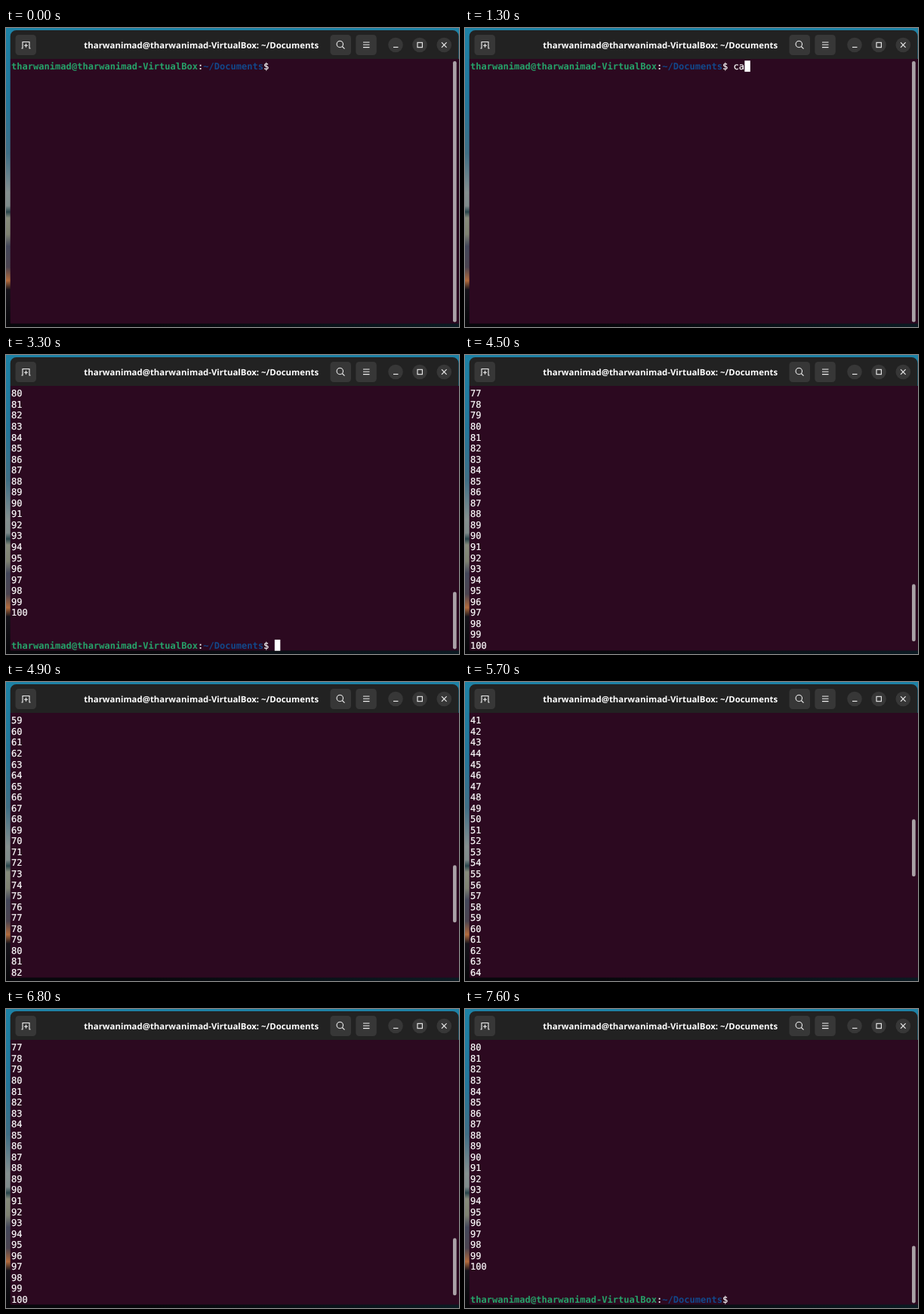
Recreate the animation shown at these times as an HTML page. Size 600x397 px, loop 8 s.

```html
<!DOCTYPE html>
<html lang="en">
<head>
<meta charset="utf-8">
<title>Terminal</title>
<style>
  html, body { margin: 0; width: 100%; height: 100%; overflow: hidden; background: #050508; }
  svg { display: block; width: 600px; height: 397px; }
  text { white-space: pre; text-rendering: geometricPrecision; }
  .title { font: bold 11.4px "Noto Sans", "Open Sans", sans-serif; fill: #fff; }
  .term text { font: 12.07px "DejaVu Sans Mono", monospace; fill: #fff; stroke: #fff; stroke-width: .2; }
  .term .user { font-weight: bold; fill: #26a269; stroke: none; }
  .term .path { font-weight: bold; fill: #12488b; stroke: none; }
  .btn { fill: #373737; }
  .icon { fill: none; stroke: #f2f2f2; stroke-width: 1.1; }
</style>
</head>
<body>
<svg viewBox="0 0 600 397">
  <defs>
    <linearGradient id="sky" x1="0" y1="0" x2="0" y2="1">
      <stop offset="0" stop-color="#1d82a6"/>
      <stop offset=".25" stop-color="#22779b"/>
      <stop offset=".42" stop-color="#3f6f86"/>
      <stop offset=".55" stop-color="#84908f"/>
      <stop offset=".595" stop-color="#7f8c8b"/>
      <stop offset=".615" stop-color="#27444a"/>
      <stop offset=".635" stop-color="#868c7c"/>
      <stop offset=".69" stop-color="#7e8272"/>
      <stop offset=".73" stop-color="#43475a"/>
      <stop offset=".8" stop-color="#4b4450"/>
      <stop offset=".845" stop-color="#b26b3c"/>
      <stop offset=".875" stop-color="#15131a"/>
      <stop offset="1" stop-color="#050508"/>
    </linearGradient>
    <linearGradient id="ground">
      <stop offset=".3" stop-color="#07070b"/>
      <stop offset="1" stop-color="#0b1a22"/>
    </linearGradient>
  </defs>

  <rect width="600" height="397" fill="url(#sky)"/>
  <rect x="6" y="392" width="594" height="5" fill="url(#ground)"/>
  <path d="M5.7 41V11a8 8 0 0 1 8-8H591.5a8 8 0 0 1 8 8V41Z" fill="#222"/>
  <rect x="5.7" y="41" width="594.3" height="351.5" fill="#2c0920"/>

  <text class="title" x="258.7" y="26.5" text-anchor="middle">tharwanimad@tharwanimad-VirtualBox: ~/Documents</text>

  <g class="btn">
    <rect x="12.5" y="9" width="27.5" height="27" rx="4.5"/>
    <rect x="429.5" y="9" width="27.5" height="27" rx="4.5"/>
    <rect x="463.3" y="9" width="27.5" height="27" rx="4.5"/>
    <circle cx="516" cy="22.5" r="9.8"/>
    <circle cx="548" cy="22.5" r="9.8"/>
    <circle cx="580.3" cy="22.5" r="9.8"/>
  </g>
  <g class="icon">
    <path d="M20.5 27H22V18.5H31V27H32.5M26.5 20.8V25.8M24 23.3H29"/>
    <circle cx="442.3" cy="21.5" r="4.2"/>
    <path d="M445.3 24.5L448.5 27.7"/>
    <path d="M473 19H481.5M473 22.3H481.5M473 25.6H481.5"/>
    <path d="M513 25.5H519.5"/>
    <rect x="545" y="19.3" width="6.4" height="6.4"/>
    <path d="M577 19.2L583.6 25.8M583.6 19.2L577 25.8"/>
  </g>

  <g class="term">
    <g id="lines"></g>
    <g id="prompt">
      <text x="7" y="55.3"><tspan class="user">tharwanimad@tharwanimad-VirtualBox</tspan>:<tspan class="path">~/Documents</tspan>$ <tspan id="typed"></tspan></text>
      <rect id="cursor" y="43.3" width="7.5" height="14.8" fill="#fff"/>
    </g>
  </g>
  <rect id="thumb" x="592" width="4.7" rx="2.35" fill="#aaa2a7"/>
</svg>

<script>
const LOOP = 8000, ROWS = 24, ROW_H = 14.55, CHAR_W = 7.267;
const LAST = 100, END = 80, PROMPT_LEN = 48;
const $ = id => document.getElementById(id);

// [start ms, typed command, cursor shown]
const typing = [
  [0, '', false], [300, '', true], [1000, '', false],
  [1100, 'c', true], [1300, 'ca', true], [1600, 'cat', true],
  [2000, 'cat ', true], [2300, 'cat f', true], [2600, 'cat fi', true],
  [2800, 'cat file.txt ', true],
  [3300, '', true], [3900, '', false], [6900, '', true], [7600, '', false]
];

// [start ms, first visible line, lines the scrollbar trails by]
const scrolling = [
  [3300, 80], [4500, 77], [4600, 71], [4800, 65], [4900, 59],
  [5300, 53], [5400, 50], [5600, 44], [5700, 41], [5800, 38], [5900, 35],
  [6100, 41], [6200, 50, 3], [6300, 59, 3], [6400, 65, 3], [6500, 68],
  [6700, 71], [6800, 77], [6900, 80]
];

const stepAt = (steps, t) => steps.findLast(s => s[0] <= t);

const rows = Array.from({ length: ROWS }, (_, i) => {
  const row = document.createElementNS('http://www.w3.org/2000/svg', 'text');
  row.setAttribute('x', 7);
  row.setAttribute('y', 55.3 + i * ROW_H);
  $('lines').append(row);
  return row;
});

function draw(t) {
  const [, command, blink] = stepAt(typing, t);
  const scroll = stepAt(scrolling, t);
  const [, top, lag = 0] = scroll || [0, 0];

  rows.forEach((row, i) => {
    const n = top + i;
    row.textContent = scroll && n <= LAST ? n : '';
  });

  const atEnd = !scroll || top === END;
  $('prompt').style.display = atEnd ? '' : 'none';
  $('prompt').setAttribute('transform', `translate(0 ${scroll ? (ROWS - 1) * ROW_H : 0})`);
  $('typed').textContent = command;
  $('cursor').setAttribute('x', 7 + (PROMPT_LEN + command.length) * CHAR_W);
  $('cursor').style.display = blink ? '' : 'none';

  $('thumb').setAttribute('y', scroll ? 43.3 + (top - lag) * 3.39 : 44);
  $('thumb').setAttribute('height', scroll ? 76 : 346.5);
}

const start = performance.now();
function tick() {
  draw((performance.now() - start) % LOOP);
  requestAnimationFrame(tick);
}
tick();
</script>
</body>
</html>
```
